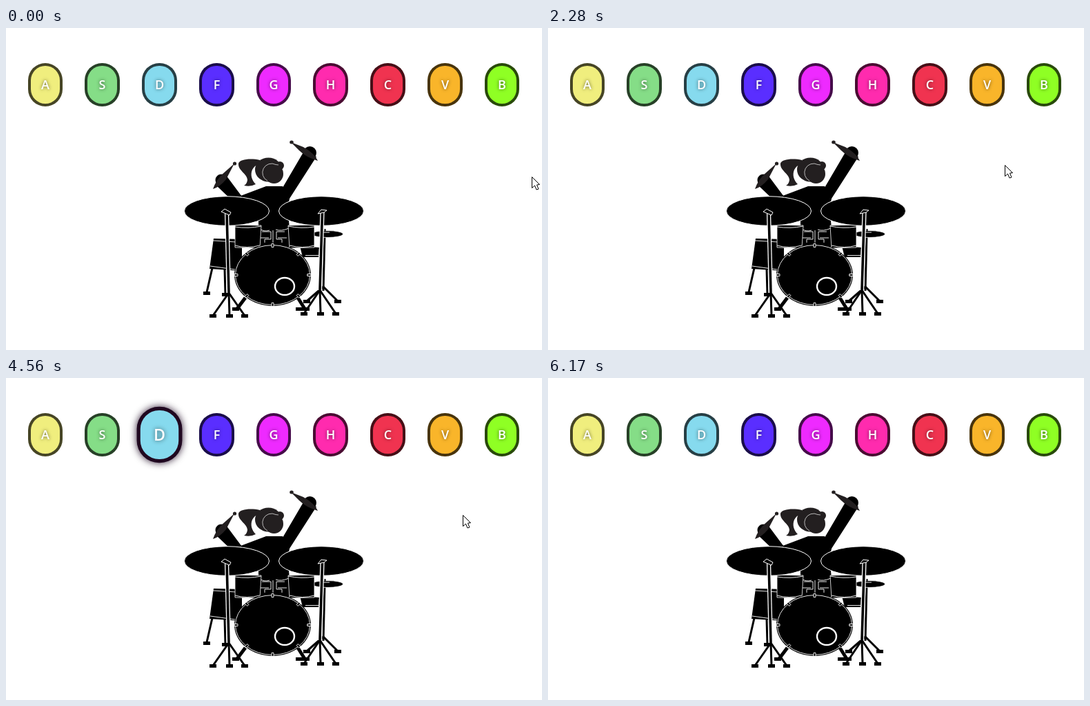
An HTML page with a canvas for the animation above (6.66 s loop, 777 by 468 pixels).

```html
<!DOCTYPE html>
<html lang="en">
<head>
<meta charset="utf-8">
<title>Drum kit</title>
<style>
html, body { margin: 0; width: 100%; height: 100%; overflow: hidden; background: #fff; }
canvas { display: block; }
</style>
</head>
<body>
<canvas id="stage" width="777" height="468"></canvas>
<script>
const ctx = document.getElementById('stage').getContext('2d');
const LOOP = 6660, TICK = 78.1;
const INK = '#000', HAIR = '#231f20', LINE = '#fff';

const keys = [
  ['A', [240, 238, 126]], ['S', [133, 221, 135]], ['D', [134, 218, 238]],
  ['F', [90, 46, 255]], ['G', [238, 42, 255]], ['H', [255, 43, 174]],
  ['C', [240, 51, 80]], ['V', [249, 181, 42]], ['B', [143, 255, 36]]
];

// The tune: each key with the tick at which it is pressed deepest
const tune = ('A1.5 S4 D8.5 F11 F13.5 G16.5 H18.5 C20.5 V22.5 B25 B27.5 C33.5 C37 C40.2 ' +
  'D43.5 D45.2 D50 F51.1 F57 D58 S61.5 S65.5 S70 S73').split(' ')
  .map(s => [s[0], +s.slice(1)]);

const clamp = u => Math.min(1, Math.max(0, u));
const mix = (a, b, u) => a + (b - a) * u;

// Each press takes one tick to grow and one to shrink
function depth(name, n) {
  return Math.max(0, ...tune.filter(t => t[0] === name).map(t => 1 - Math.abs(n - t[1])));
}

function paint(fill, stroke, width = 1) {
  if (fill) { ctx.fillStyle = fill; ctx.fill(); }
  if (stroke) { ctx.strokeStyle = stroke; ctx.lineWidth = width; ctx.stroke(); }
}

function poly(pts, fill = INK, stroke, width) {
  ctx.beginPath();
  for (let i = 0; i < pts.length; i += 2) ctx.lineTo(pts[i], pts[i + 1]);
  ctx.closePath();
  paint(fill, stroke, width);
}

function oval(x, y, rx, ry, fill = INK, stroke, width) {
  ctx.beginPath();
  ctx.ellipse(x, y, rx, ry, 0, 0, Math.PI * 2);
  paint(fill, stroke, width);
}

function shape(d, fill = INK) {
  ctx.fillStyle = fill;
  ctx.fill(new Path2D(d));
}

function line(d, color = LINE, width = 0.9) {
  ctx.strokeStyle = color;
  ctx.lineWidth = width;
  ctx.stroke(new Path2D(d));
}

function bar(x1, y1, x2, y2, w, edge = 0) {
  const d = `M${x1} ${y1}L${x2} ${y2}`;
  if (edge) line(d, LINE, w + 2 * edge);
  line(d, INK, w);
}

function foot(x, y) {
  ctx.fillStyle = INK;
  ctx.fillRect(x - 5, y - 2, 10, 5);
}

function drawKey([name, rgb], i, p) {
  const left = Math.floor(32 + 82.75 * i), right = Math.floor(82.75 + 82.75 * i);
  const w = right - left, s = 1 + 0.29 * p;
  const edge = rgb.map((c, k) => Math.round(mix(c * 0.29, [32, 8, 32][k], p)));
  ctx.save();
  ctx.translate((left + right) / 2, 82.5);
  ctx.scale(s, s);
  ctx.beginPath();
  ctx.roundRect(-w / 2, -31.5, w, 63, 25);
  ctx.shadowColor = `rgba(24,4,30,${0.9 * p})`;
  ctx.shadowBlur = 8 * p * s;
  paint(`rgb(${edge})`);
  ctx.shadowColor = 'transparent';
  ctx.beginPath();
  ctx.roundRect(4 - w / 2, -27.5, w - 8, 55, 21);
  paint(`rgb(${rgb})`);
  ctx.font = '600 18px "Open Sans", "Noto Sans", sans-serif';
  ctx.textAlign = 'center';
  ctx.fillStyle = '#fff';
  ctx.shadowColor = 'rgba(0,0,0,.6)';
  ctx.shadowBlur = 5 * s;
  ctx.fillText(name, 0, 6.5);
  ctx.restore();
}

function drawPlayer() {
  // arms and body
  poly([401, 232, 432, 179, 450, 187, 409, 251]);
  oval(440.5, 181.5, 9.5, 9.5);
  poly([304, 228, 319, 214, 342, 245, 326, 249]);
  oval(312, 221, 8.5, 8.5);
  shape('M340 244L377 230H401L411 248L408 262L411 290V318H366V270L348 262Z');

  // sticks
  shape('M413 166L431 173Q447 182 452 193Q435 188 425 178Z', HAIR);
  oval(414, 166, 2.8, 2.5, HAIR);
  shape('M331 197L319 220Q310 231 300 234Q304 222 313 213Z', HAIR);
  oval(331.5, 197, 2.6, 2.6, HAIR);

  // head
  shape('M368 192C354 189 338 191 337 197C336 207 350 212 350 221Q349 227 345 229' +
    'Q355 231 362 227C356 221 354 213 357 206Q360 200 368 197Z', HAIR);
  oval(380.5, 206, 19.5, 17.5, HAIR);
  oval(388.5, 212, 13.5, 14, HAIR);
  oval(397, 200, 6, 6, HAIR);
  line('M379 222A13 13 0 0 1 391 198.5L395 199', '#ddd', 0.8);
}

function drawStand(x, y, top, lean, floor) {
  for (const dx of [-23, 23, 1]) {
    bar(x, y, x + dx, floor, 3);
    foot(x + dx, floor);
  }
  bar(x - lean, top, x, y, 3.6, 1.3);
}

function drawTom(x, y, side) {
  ctx.save();
  ctx.translate(x, y);
  ctx.scale(side, 1);
  poly([-19, 0, 19, 1, 17, 34, -19, 33], INK, LINE, 0.8);
  line('M-19 3Q0 6 19 2M-19 30Q-2 35 17 30');
  ctx.restore();
}

function drawBass() {
  const x = 386.5, y = 359;
  bar(347, 392, 335, 408, 5);
  bar(423, 392, 433, 408, 5);
  for (const fx of [333, 425, 435]) foot(fx, 408);
  oval(x, y, 55.5, 45);
  oval(x, y, 54, 43.4, null, LINE, 0.9);
  for (let a = 0; a < 7; a += Math.PI / 4) {
    ctx.save();
    ctx.translate(x + 53 * Math.cos(a), y + 43 * Math.sin(a));
    ctx.rotate(a);
    ctx.beginPath();
    ctx.rect(-2.5, -1.5, 5, 3);
    paint(INK, LINE, 0.9);
    ctx.restore();
  }
  oval(404, 375.5, 14, 12.5, INK, LINE, 2.4);
}

function drawKit() {
  // floor tom
  bar(299, 349, 291, 384, 3);
  bar(317, 350, 318, 387, 3);
  foot(291, 385);
  foot(318, 387);
  poly([301, 306, 342, 307, 342, 353, 295, 350]);
  line('M300 309L333 311M296 346L332 351');

  // hi-hat and side drum
  bar(462, 300, 460, 382, 3);
  for (const dx of [-24, 21]) {
    bar(460, 376, 460 + dx, 397, 3);
    foot(460 + dx, 397);
  }
  poly([426, 317, 454, 319, 453, 333, 430, 333]);
  line('M434 330.5H453');
  oval(466, 299.5, 22.5, 5, INK, LINE, 0.8);
  bar(462.5, 292, 462.5, 300, 2);
  line('M458 297H469');

  // tom mounts
  line('M366 291Q374 297 382 294M371 296H384V307H375V312M369 305H381M387 294V312' +
    'M410 291Q399 296 391 293M404 296H392V307H400V312M394 305H407');
  drawTom(351, 286, 1);
  drawTom(428, 286, -1);
  drawBass();

  // cymbals on their stands
  for (const x of [320, 457]) oval(x, 266, 61.5, 21.3, INK, LINE);
  drawStand(323, 385, 268, 3, 418);
  drawStand(455, 381, 268, -3.5, 415);
  poly([312, 267, 317, 263, 326, 268, 324, 272], INK, LINE);
  poly([452, 270, 457, 264, 465, 265, 461, 268], INK, LINE);
}

function drawMouse(n) {
  if (n > 78) return;
  const come = clamp(n / 5), drop = clamp((n - 64) / 6), leave = clamp((n - 71) / 7);
  const x = 762 - 100 * come - 6 * drop + 39 * leave;
  const y = 216 - 17 * come + 74 * drop + 192 * leave ** 2.5;
  ctx.save();
  ctx.translate(Math.round(x) + 0.5, Math.round(y) + 0.5);
  poly([0, 0, 0, 16, 4, 12.5, 6.5, 18.5, 9.5, 17.5, 7, 11.5, 11, 11], '#fff', '#000');
  ctx.restore();
}

function frame(time) {
  const n = Math.floor((time % LOOP + 10) / TICK);
  ctx.fillStyle = '#fff';
  ctx.fillRect(0, 0, 777, 468);
  drawPlayer();
  drawKit();
  keys.forEach((key, i) => drawKey(key, i, depth(key[0], n)));
  drawMouse(n);
}

let start;
function loop(now) {
  start ??= now;
  frame(now - start);
  requestAnimationFrame(loop);
}
frame(0);
requestAnimationFrame(loop);
</script>
</body>
</html>
```
